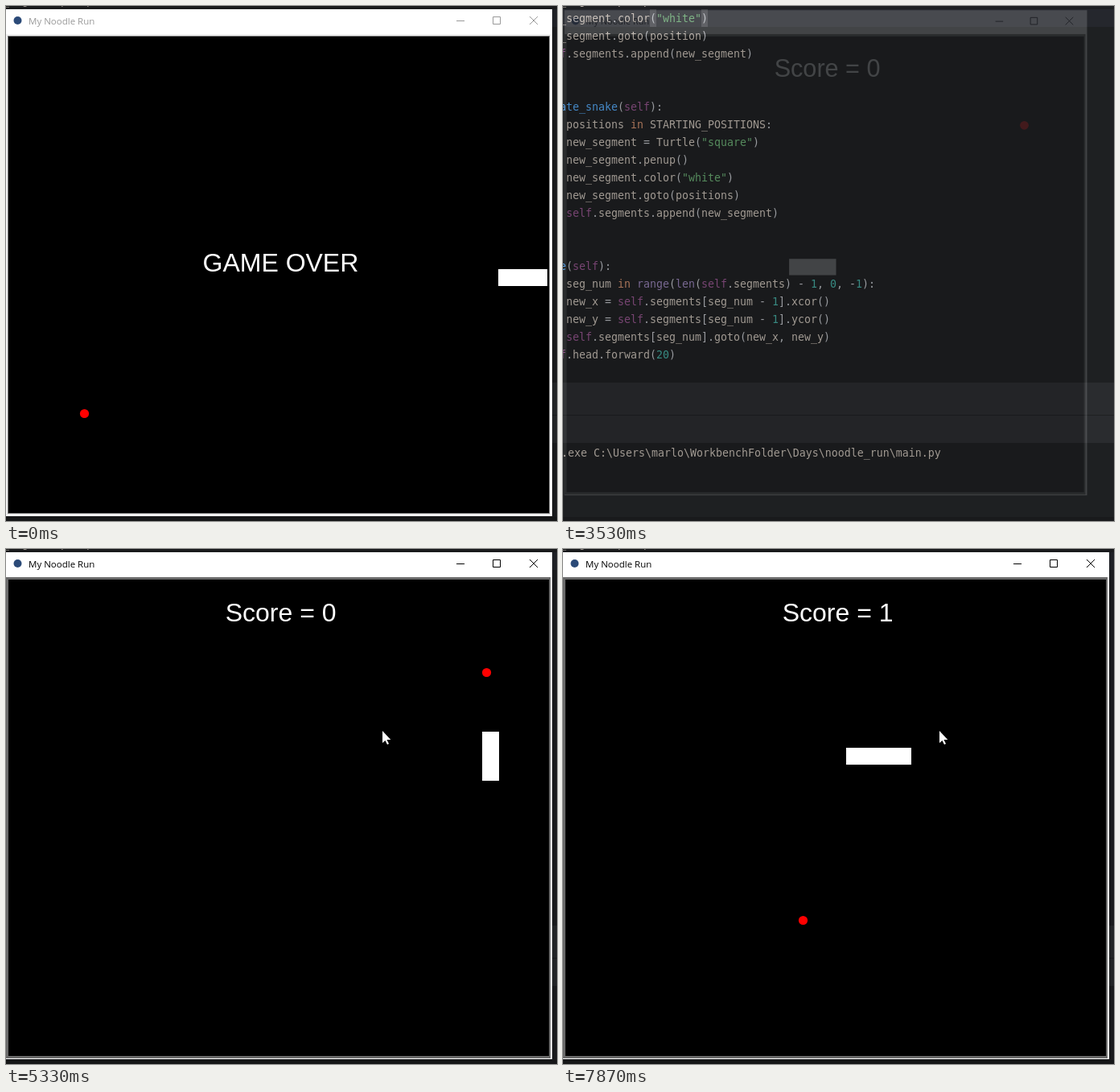
Write an HTML page that moves like this. It is 685 px wide and 640 px high and loops after 8000 ms.

```html
<!DOCTYPE html>
<html lang="en">
<head>
<meta charset="utf-8">
<title>Editor and game window</title>
<style>
  html, body { margin: 0; width: 100%; height: 100%; overflow: hidden; background: #1f2123; }
  svg { display: block; width: 685px; height: 640px; }
  .code { font: 13.29px "DejaVu Sans Mono", monospace; white-space: pre; }
  .title { font: 11.5px "Open Sans", sans-serif; }
  .big { font: 32px "Liberation Sans", Arial, sans-serif; fill: #fff; }
</style>
</head>
<body>
<svg viewBox="0 0 685 640">
  <rect width="685" height="640" fill="#1f2123"/>
  <rect y="4" width="685" height="22" fill="#26282e"/>
  <path d="M108 4h8v22h-8zM172 4h8v22h-8z" fill="#43454a"/>
  <path d="M0 468h685v40H0zM0 509h685v34H0z" fill="#2b2d30"/>
  <rect y="635" width="685" height="5" fill="#1a1b1d"/>
  <g id="code" class="code"></g>
  <rect id="caret" x="179" y="6" width="2" height="19" fill="#e4e6ea"/>

  <rect id="shade" width="685" height="640" fill="#000" fill-opacity=".2"/>
  <g id="win">
    <rect y="4" width="679" height="630" fill="#fff"/>
    <rect id="ring" y="35" width="677" height="598"/>
    <rect id="edge" x="2" y="37" width="674" height="594" fill="#767676"/>
    <rect x="3" y="38" width="672" height="592"/>
    <circle cx="14.5" cy="18" r="5" fill="#2b4a78"/>
    <text id="title" class="title" x="28" y="23">My Noodle Run</text>
    <path id="buttons" d="M560 18.5h10M605.5 13.5h9v9h-9zM651 13l10 10M661 13l-10 10" fill="none"/>
    <circle id="food" r="5.6" fill="#f00"/>
    <path id="snake" fill="#fff"/>
    <text id="score" class="big" x="272.7" y="90"></text>
    <text id="over" class="big" x="244.5" y="330">GAME OVER</text>
    <path id="pointer" d="M0 0v15l3.5-3 2.5 5 2-1-2.5-5h4.8z" fill="#fff"/>
  </g>
</svg>
<script>
const LOOP = 8000, OPEN = 3530, EAT_STEP = 22;
const $ = id => document.getElementById(id);
const set = (id, attrs) => {
  for (const name in attrs) $(id).setAttribute(name, attrs[name]);
};
const show = (id, on) => set(id, { visibility: on ? 'inherit' : 'hidden' });

// Editor text: [row, x, text]
const LINES = [
  [-1, -4, '_segment.penup()'],
  [0, -4, '_segment.color("white")'],
  [1, -4, '_segment.goto(position)'],
  [2, -4, 'f.segments.append(new_segment)'],
  [5, -4, 'ate_snake(self):'],
  [6, 4, 'positions in STARTING_POSITIONS:'],
  [7, 4, 'new_segment = Turtle("square")'],
  [8, 4, 'new_segment.penup()'],
  [9, 4, 'new_segment.color("white")'],
  [10, 4, 'new_segment.goto(positions)'],
  [11, 4, 'self.segments.append(new_segment)'],
  [14, -4, 'e(self):'],
  [15, 4, 'seg_num in range(len(self.segments) - 1, 0, -1):'],
  [16, 4, 'new_x = self.segments[seg_num - 1].xcor()'],
  [17, 4, 'new_y = self.segments[seg_num - 1].ycor()'],
  [18, 4, 'self.segments[seg_num].goto(new_x, new_y)'],
  [19, -4, 'f.head.forward(20)']
];
const PLAIN = '#c6bdb4';

function colorOf(token, first, line) {
  if (token[0] === '"') return '#6aab73';
  if (token === 'self' || (first && token === 'f')) return '#94558d';
  if (first && line.endsWith('(self):')) return '#56a8f5';
  if (token === 'in') return '#cf8e6d';
  if (token === 'range' || token === 'len') return '#9580b4';
  if (/^\d/.test(token)) return '#45aaa0';
  return /^\w/.test(token) ? PLAIN : '#bcbec4';
}

function addText(parent, tag, attrs, text = '') {
  const el = document.createElementNS('http://www.w3.org/2000/svg', tag);
  for (const name in attrs) el.setAttribute(name, attrs[name]);
  el.textContent = text;
  return parent.appendChild(el);
}

for (const [row, x, line] of LINES) {
  const text = addText($('code'), 'text', { x, y: 20 + 22 * row });
  line.match(/"\w+"|\w+|\s+|[^\w\s"]+/g).forEach((token, i) =>
    addText(text, 'tspan', { fill: colorOf(token, i === 0, line) }, token));
}
addText($('code'), 'text', { x: -2, y: 560, fill: PLAIN },
  '.exe C:\\Users\\marlo\\WorkbenchFolder\\Days\\noodle_run\\main.py');

// Snake route: starting cells followed by one cell per step
const trail = [[292, 327], [312, 327], [332, 327]];
for (const [count, dx, dy] of [[13, 20, 0], [11, 0, -20], [4, -20, 0], [7, 0, 20], [8, -20, 0]]) {
  for (let i = 0; i < count; i++) {
    const [x, y] = trail[trail.length - 1];
    trail.push([x + dx, y + dy]);
  }
}

// Steps come in pairs every 200 ms
const pairs = (start, gap, count) =>
  Array.from({ length: count }, (_, i) => start + 200 * (i >> 1) + gap * (i % 2));
const stepTimes = [...pairs(3670, 60, 25), ...pairs(6200, 70, 13), 7530, 7600, 7730, 7800, 7870];

// Window opening: [time, opacity, scale]
const OPENING = [[OPEN, .16, .957], [3600, .6, .984], [3670, .92, .997], [3730, 1, 1]];

const cellPath = cells => cells.map(([x, y]) => `M${x} ${y}h21v21h-21z`).join('');

function drawWindow(t) {
  const ended = t < 530;
  const visible = ended || t >= OPEN;
  show('win', visible);
  show('shade', visible);
  if (!visible) return;

  const [, opacity, scale] = ended ? [0, 1, 1] : OPENING.filter(([at]) => at <= t).pop();
  set('win', { opacity, transform: `translate(39 33) scale(${scale}) translate(-39 -33)` });
  set('shade', { opacity });
  set('ring', { fill: ended ? '#f0f0f0' : '#6a6a6a' });
  set('title', { fill: ended ? '#999' : '#000' });
  set('buttons', { stroke: ended ? '#999' : '#000' });
  show('edge', ended);
  show('over', ended);
  show('score', !ended);
  show('pointer', t >= 3930);
  set('pointer', { transform: t < 4000 ? 'translate(471 225)' : 'translate(468 226)' });

  const step = stepTimes.filter(at => at <= t).length;
  const eaten = step >= EAT_STEP;
  const length = step > EAT_STEP ? 4 : 3;
  const cells = ended
    ? [[612, 327], [632, 327], [652, 327]]
    : trail.slice(step + 3 - length, step + 3);
  set('snake', { d: cellPath(cells) });
  const [cx, cy] = ended ? [97.5, 506.5] : eaten ? [298.5, 461.5] : [597.5, 153.5];
  set('food', { cx, cy });
  $('score').textContent = `Score = ${eaten ? 1 : 0}`;
}

function draw(t) {
  show('caret', (t >= 530 && t < 1070) || (t >= 1530 && t < 2070) || (t >= 2530 && t < 3070));
  drawWindow(t);
}

const start = performance.now();
function tick() {
  draw((performance.now() - start) % LOOP);
  requestAnimationFrame(tick);
}
tick();
</script>
</body>
</html>
```
